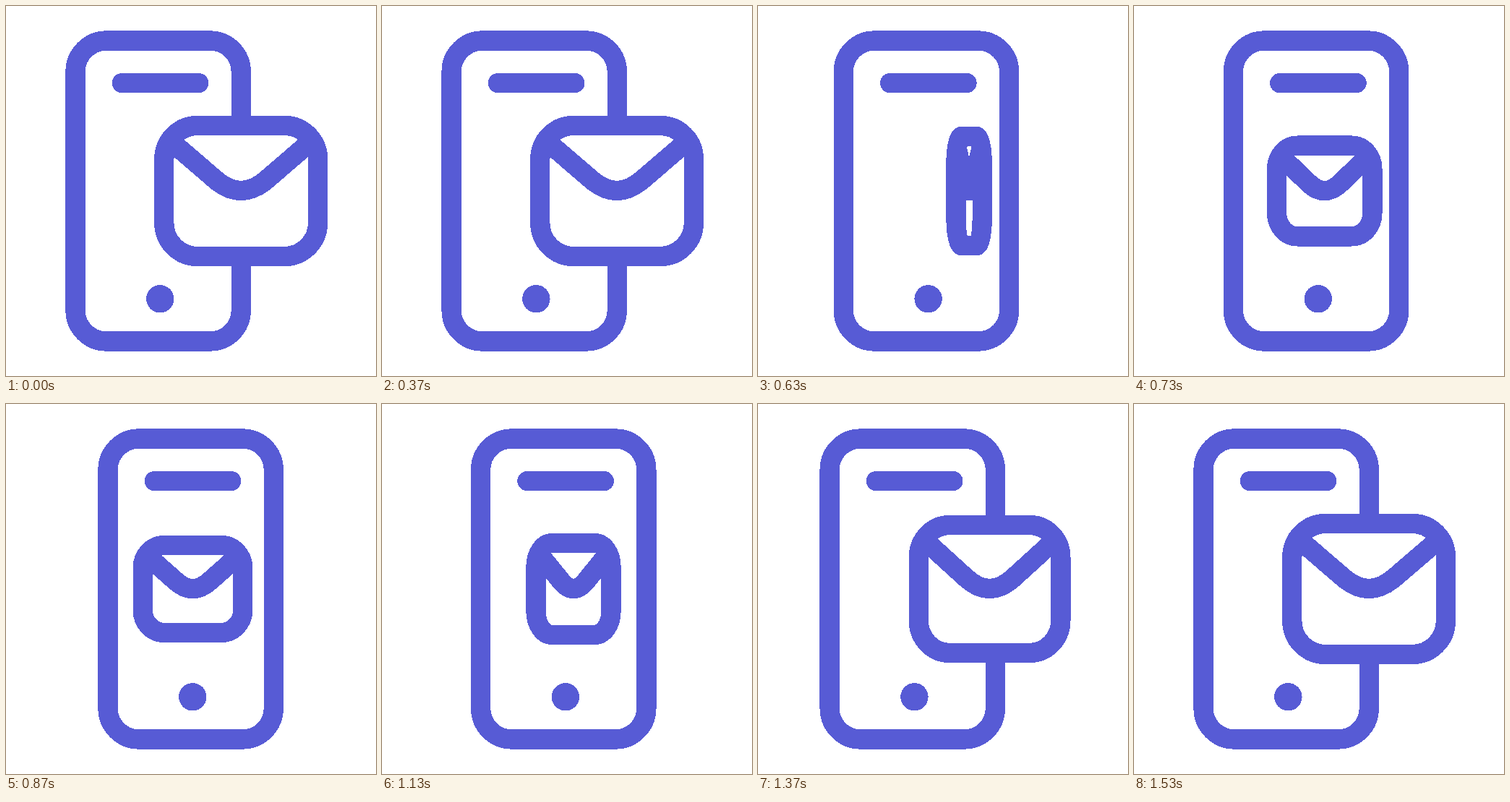
Recreate the animation shown at these times as an HTML page. Size 512 by 512 pixels, loop 1.57 s.

```html
<!DOCTYPE html>
<html lang="en">
<head>
<meta charset="utf-8">
<title>Phone and mail</title>
<style>
  html, body { margin: 0; height: 100%; overflow: hidden; background: #fff; }
  svg { display: block; width: 100vw; height: 100vh; shape-rendering: crispEdges; }
  .line {
    fill: none; stroke: #575bd5; stroke-width: 27.3;
    stroke-linecap: round; stroke-linejoin: round;
    vector-effect: non-scaling-stroke;
  }
  .card { fill: #fff; }
  .dot { fill: #575bd5; }
</style>
</head>
<body>
<svg viewBox="0 0 512 512">
  <g id="phone">
    <rect class="line" x="96" y="48" width="229.3" height="416" rx="43"/>
    <path class="line" d="M160.3 106.6H266.7"/>
    <circle class="dot" cx="213.3" cy="405.3" r="19.2"/>
  </g>
  <g id="mail">
    <rect class="line card" x="-106.4" y="-90.6" width="212.8" height="181.2" rx="46.5"/>
    <path class="line" d="M-97.3 -69L-35.3 -15.7Q0 14.7 35.3 -15.7L97.3 -69"/>
  </g>
</svg>
<script>
  const LOOP = 1570, FPS = 30, LAST = 46;
  const phone = document.getElementById('phone');
  const mail = document.getElementById('mail');

  // Ease with control points (x1, 0) and (x2, 1).
  function ease(x1, x2) {
    return x => {
      let lo = 0, hi = 1;
      for (let i = 0; i < 30; i++) {
        const s = (lo + hi) / 2, r = 1 - s;
        if (3 * s * r * r * x1 + 3 * s * s * r * x2 + s ** 3 < x) lo = s;
        else hi = s;
      }
      return lo * lo * (3 - 2 * lo);
    };
  }

  // Frames of each leg: the mail goes into the phone, then out again.
  const legs = [
    { from: 10, to: 27, move: ease(0.859, 0.222), turn: ease(0.57, 0.432) },
    { from: 27, to: 47, move: ease(0.864, 0.156), turn: ease(0.542, 0.353) }
  ];

  const mix = (a, b, k) => a + (b - a) * k;

  function draw(frame) {
    const back = frame >= legs[1].from;
    const leg = legs[back ? 1 : 0];
    const t = Math.max(0, (frame - leg.from) / (leg.to - leg.from));
    const m = leg.move(t);
    const k = back ? 1 - m : m;
    const sx = mix(1, 0.65, k) * Math.cos(Math.PI * leg.turn(t));
    const sy = mix(1, 0.667, k);
    phone.setAttribute('transform', `translate(${mix(0, 45.1, k)} 0)`);
    mail.setAttribute('transform',
      `translate(${mix(325.2, 258.3, k)} 256) scale(${sx} ${sy})`);
  }

  const start = performance.now();
  function tick() {
    const ms = (performance.now() - start) % LOOP;
    draw(Math.min(LAST, Math.floor((ms + 5) * FPS / 1000)));
    requestAnimationFrame(tick);
  }
  tick();
</script>
</body>
</html>
```
